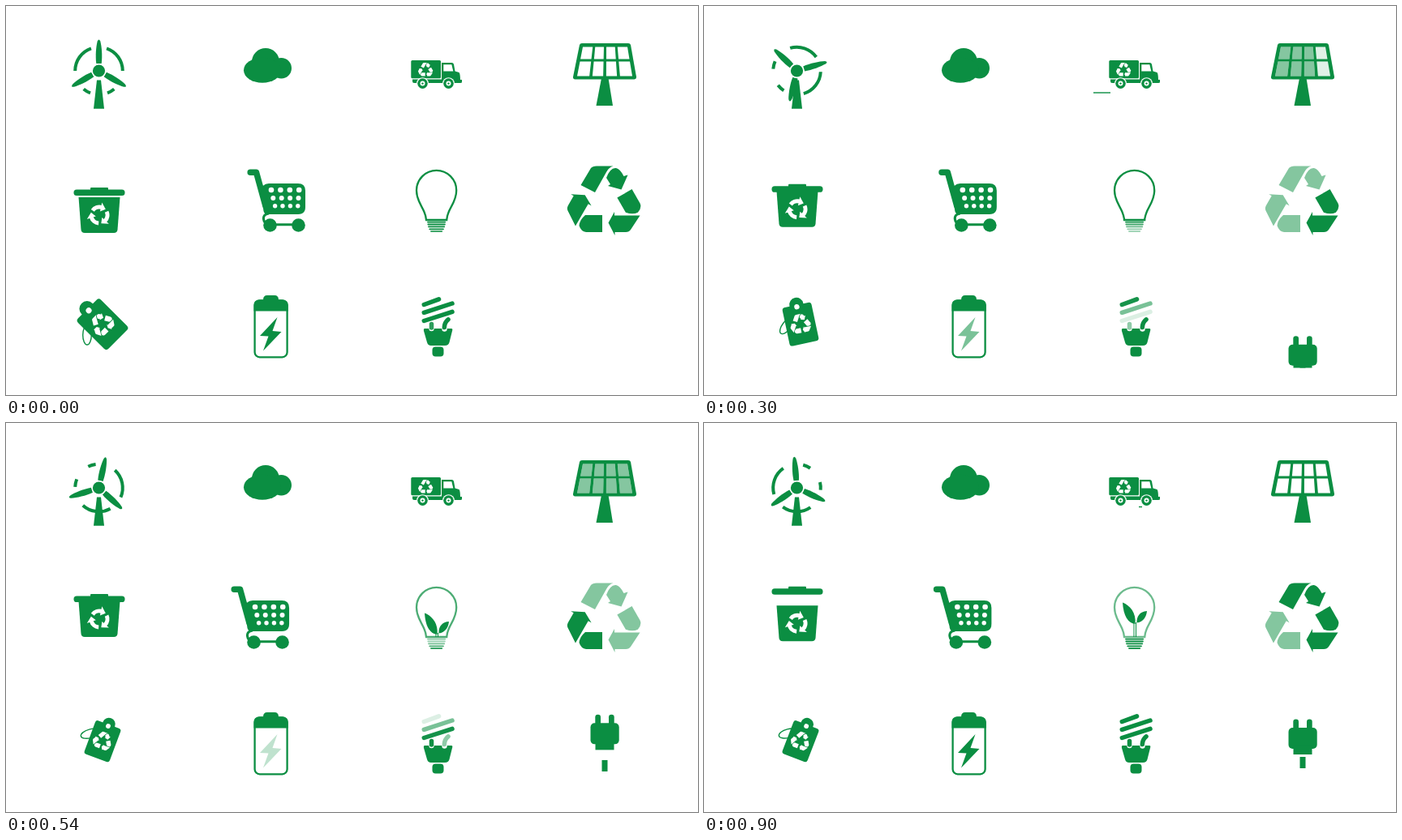
Recreate the animation shown at these times as an HTML page. Size 853 by 480 pixels, loop 960 ms.

```html
<!DOCTYPE html>
<html lang="en">
<head>
<meta charset="utf-8">
<title>Green icons</title>
<style>
  html, body { margin: 0; width: 100%; height: 100%; overflow: hidden; background: #fff; }
  svg { display: block; width: 100vw; height: 100vh; fill: #0b8e42; }
  .line { fill: none; stroke: #0b8e42; }
  .round { stroke-linecap: round; stroke-linejoin: round; }
  .white { fill: #fff; }
</style>
</head>
<body>
<svg viewBox="0 0 853 480">
  <defs>
    <path id="band" d="M-3 16V37H-23Q-29 36.500-31.500 29Q-31 22-24 16Z"/>
    <path id="arrow" d="M4.500 25.500L12 12V16.500H43.500L32 34Q30 37 26 37H12.500V41Z"/>
    <g id="left"><use href="#band"/><use href="#arrow" transform="rotate(120)"/></g>
    <g id="right"><use href="#band" transform="rotate(-120)"/><use href="#arrow"/></g>
    <g id="top">
      <path d="M-29.500-21L-17-42Q-15-44.500-10-44.500H10.500Q5-43 2-37L-12-12Z"/>
      <path d="M2-30Q7-43 14-42Q19-41 23.500-32L28.500-33.500L20.500-15.500L4-20L7-22Z"/>
    </g>
    <g id="recycle"><use href="#left"/><use href="#right"/><use href="#top"/></g>
    <g id="turn">
      <path d="M-8.200-5.700A10 10 0 0 1 2.600-9.700" fill="none" stroke="#fff" stroke-width="5"/>
      <path d="M.9-4.400L3.300-15.600L7.800-7.200Z"/>
    </g>
    <path id="blade" d="M-3.200-9C-4.500-18-3.500-30-1.800-36.500Q0-40.500 1.800-36.500C3.500-30 4.500-18 3.200-9Z"/>
    <path id="glass" d="M518 264C517.500 250 506 244 506 227.500A24.600 24.600 0 0 1 555.200 227.500C555.200 244 543.700 250 543.200 264Z"/>
    <clipPath id="inGlass"><use href="#glass"/></clipPath>
    <clipPath id="floor"><rect x="700" y="340" width="80" height="106.500"/></clipPath>
  </defs>

  <!-- wind turbine -->
  <g transform="translate(114.500 80)">
    <g id="ring" class="line" stroke-width="4"></g>
    <path d="M-2.500 11.500H2.500L6.500 46.700H-6.500Z"/>
    <g id="blades">
      <use href="#blade"/><use href="#blade" transform="rotate(120)"/><use href="#blade" transform="rotate(240)"/>
    </g>
    <circle r="9" class="white"/><circle r="7.600"/>
  </g>

  <!-- cloud -->
  <circle cx="320" cy="69" r="17"/>
  <circle cx="339.300" cy="76.700" r="12.700"/>
  <ellipse cx="316" cy="79.200" rx="23" ry="15.500"/>

  <!-- truck -->
  <g id="road"></g>
  <rect x="499.300" y="67" width="36.700" height="22.300" rx="1.500"/>
  <use href="#recycle" class="white" transform="translate(517.300 79) scale(.2)"/>
  <path d="M537 70H549.500Q551.500 70 552 72L553.500 80.500L558.500 82Q559.800 83 560 91H562V94Q562 95 560 95H503Q501 95 501 93V90.500H537Z"/>
  <path class="white" d="M539.300 72.300H549.300L551.300 80.500H539.300Z"/>
  <g id="wheels"></g>

  <!-- solar panel -->
  <path d="M710 46H767Q769.500 46 770 48L777 87.500Q777.300 90.500 774.500 90.500H701.500Q698.700 90.500 699 87.500L707 48Q707.500 46 710 46Z"/>
  <path d="M734 89H742.500L748 123H727.500Z"/>
  <g id="cells"></g>

  <!-- bin -->
  <g id="bin">
    <path d="M89.500 236H140.500L137.500 276Q137 280 133 280H97Q93 280 92.500 276Z"/>
    <g class="white" transform="translate(115 258)">
      <use href="#turn"/><use href="#turn" transform="rotate(120)"/><use href="#turn" transform="rotate(240)"/>
    </g>
  </g>
  <g id="lid">
    <rect x="83.500" y="226.500" width="63" height="7.600" rx="3.600"/><rect x="104" y="224.100" width="22" height="5" rx="1"/>
  </g>

  <!-- cart -->
  <g id="cart">
    <path class="line round" stroke-width="7.500" d="M301.200 205.200H308.500L320 247"/>
    <path d="M324 219H360Q369 219 369 228V248Q369 257 360 257H322Q318.500 257 317.500 253L314 230Q315 219 324 219Z"/>
    <path class="line" stroke-width="3" d="M324 256C317 257 316 262 319 267M325 269.800H360"/>
    <circle cx="325.500" cy="270.500" r="8.300"/><circle cx="360.500" cy="270.500" r="8.300"/>
    <g id="holes" class="white"></g>
  </g>

  <!-- bulb -->
  <g clip-path="url(#inGlass)">
    <g id="plant">
      <path d="M516 221.500C525 225 533 234 531.500 248C522.500 247 517 238 516 221.500Z"/>
      <path d="M546 232C545.500 239 541 246 533.500 246.500C533 239 537 232.500 546 232Z"/>
      <path class="line" d="M530 246V310M532.500 246V310"/>
    </g>
  </g>
  <use href="#glass" id="outline" class="line" stroke-width="2.300"/>
  <g id="screw"></g>

  <!-- recycling arrows -->
  <g transform="translate(738 242)">
    <use href="#left" id="recLeft"/><use href="#top" id="recTop"/><use href="#right" id="recRight"/>
  </g>

  <!-- tag -->
  <ellipse id="string" class="line" stroke-width="1.400" rx="5.300" ry="12"/>
  <g id="tag">
    <rect x="-20" y="-26.500" width="40" height="53" rx="4"/>
    <circle cy="-27" r="9.500"/><circle cy="-24" r="3.500" class="white"/>
    <use href="#recycle" class="white" transform="scale(.31)"/>
  </g>

  <!-- battery -->
  <rect x="306.600" y="363.500" width="40" height="69.800" rx="6" class="line" stroke-width="2.300"/>
  <path d="M305.500 376.500V369Q305.500 362.500 312 362.500H317Q317 357 322 357H331Q336 357 336 362.500H341Q347.700 362.500 347.700 369V376.500Z"/>
  <path id="bolt" d="M334.500 384L313 407L323.500 407.500L317 425.500L339.500 402L328.500 401Z"/>

  <!-- spiral lamp -->
  <path d="M516 398H549Q551 398 550 401L546.500 415Q545.500 419 541 419H524Q520 419 519 415L515 401Q514.500 398 516 398Z"/>
  <rect x="525.500" y="420.500" width="14" height="12" rx="4"/>
  <circle cx="524.500" cy="398" r="3.200" class="white"/><circle cx="540.500" cy="398.500" r="3.200" class="white"/>
  <g id="tubes" class="line round" stroke-width="5.500">
    <path d="M524.500 392.500V397"/>
    <path d="M515.300 388.500L550 377.300"/>
    <path d="M515.300 378.300L550 367"/>
    <path d="M515.300 368.500L533.500 361.800"/>
    <path d="M540.300 396.500Q540.500 390.500 545 386.800"/>
  </g>

  <!-- plug -->
  <g clip-path="url(#floor)">
    <g id="plug">
      <rect x="726.300" width="6.700" height="16" rx="3.300"/><rect x="743" width="6.700" height="16" rx="3.300"/>
      <rect x="720.500" y="10.500" width="35.200" height="26" rx="5"/><rect x="726.500" y="33" width="23" height="10.500"/>
    </g>
    <rect id="cord" x="734.500" width="7" height="14"/>
  </g>
</svg>

<script>
const STEP = 60, COUNT = 16;
const $ = id => document.getElementById(id);
const clamp = v => Math.max(0, Math.min(1, v));
const mix = (a, b, u) => a + (b - a) * u;

// 0 to 1 between a and b: straight and eased
const ramp = (f, a, b) => clamp((f - a) / (b - a));
const ease = (f, a, b) => { const u = ramp(f, a, b); return u * u * (3 - 2 * u); };

// opacity that sinks by depth around mid
const dip = (f, mid, reach, depth) => 1 - depth * clamp(1 - Math.abs(f - mid) / reach);
// opacity that is halved from a to b
const half = (f, a, b) => 1 - .5 * ramp(f, a, a + 1) * (1 - ramp(f, b - 2, b));

const move = (el, x, y, more = '') => el.setAttribute('transform', `translate(${x} ${y}) ${more}`);
const fade = (el, value) => el.setAttribute('opacity', value);

function add(parent, tag, attrs) {
  const el = document.createElementNS('http://www.w3.org/2000/svg', tag);
  for (const k in attrs) el.setAttribute(k, attrs[k]);
  return $(parent).appendChild(el);
}

function polar(deg, r) {
  const a = deg * Math.PI / 180;
  return `${r * Math.sin(a)} ${-r * Math.cos(a)}`;
}
for (const [a, b] of [[270, 341], [19, 90], [140, 159], [201, 220]])
  add('ring', 'path', { d: `M${polar(a, 29.3)}A29.3 29.3 0 0 1 ${polar(b, 29.3)}` });

for (const cx of [513.5, 545.5])
  [7.4, 6.3, 3, 1.2].forEach((r, n) => add('wheels', 'circle', { cx, cy: 95.6, r, class: n % 2 ? '' : 'white' }));

// solar cells: columns lean with the panel's sides
const columns = [0, 1, 2, 3].map(c => {
  const point = (u, y) => {
    const v = (y - 50.5) / 36;
    return `${711 - 7 * v + u / 4 * (55 + 13 * v)} ${y}`;
  };
  const l = c ? c + .11 : 0, r = c < 3 ? c + .89 : 4;
  const d = [[50.5, 65.4], [68.4, 86.5]].map(([a, b]) =>
    `M${point(l, a)}L${point(r, a)}L${point(r, b)}L${point(l, b)}Z`).join('');
  add('cells', 'path', { d, class: 'white' });
  return add('cells', 'path', { d });
});

for (let row = 0; row < 3; row++)
  for (let n = 0; n < 4; n++)
    add('holes', 'circle', { cx: 327 + 2.3 * row + n * (11.4 - row), cy: 227 + 9.9 * row, r: 3.3 - .3 * row });

const threads = [0, 1, 2, 3, 4].map(n => {
  const width = 23 - .5 * n * n;
  return add('screw', 'rect', { x: 530.6 - width / 2, y: 265.7 + 2.9 * n, width, height: 1.8, rx: .8 });
});
const tubes = [...$('tubes').children];

const road = [
  { start: 611, y: 106.3, edge: 568 },
  { start: 801, y: 101.8, edge: 540 },
  { start: 918, y: 102.8, edge: 540 }
].map(line => ({ ...line, el: add('road', 'rect', { y: line.y, height: 1.4 }) }));

function draw(f) {
  const spin = `rotate(${14.7 * f})`;
  move($('ring'), 0, 0, spin);
  move($('blades'), 0, 0, spin);

  for (const { start, edge, el } of road) {
    const right = start - 22 * f;
    const a = Math.max(480, right - 30), b = Math.min(edge, right);
    el.setAttribute('x', a);
    el.setAttribute('width', Math.max(0, b - a));
  }

  columns.forEach((el, c) => {
    const on = .4 + 1.4 * c, off = 10.2 + .65 * c;
    fade(el, .5 * ramp(f, on, on + 1.6) * (1 - ramp(f, off, off + 1.6)));
  });

  // the bin pushes its lid up, then drops away from it
  const rise = 25.3 * ramp(f, 1.7, 13.2);
  move($('bin'), 0, 5.2 * Math.max(0, f - 13.2) - rise);
  move($('lid'), 0, -Math.max(0, rise - 3));

  move($('cart'), -21.4 * (ease(f, 1, 10.5) - ease(f, 11.5, 23.5)), 0);

  move($('plant'), 0, Math.max(0, 76 - 7 * f));
  fade($('outline'), dip(f, 13, 6, .8));
  threads.forEach((el, n) => fade(el, dip(f, 10 - 1.4 * n, 5.5, .65)));

  const turn = f % 15;
  fade($('recLeft'), half(turn, 0, 7.6));
  fade($('recTop'), half(turn, 3, 11.6));
  fade($('recRight'), half(turn, 6, 11.6));

  const swing = ease(f, .5, 9.5);
  move($('tag'), 119, 392.7, `rotate(${mix(-45, 21, swing)}) scale(${mix(1, .83, swing)})`);
  move($('string'), mix(100, 104, swing), mix(406, 383, swing), `rotate(${mix(0, 75, swing)})`);

  fade($('bolt'), dip(f, 7.7, 5, 1));
  tubes.forEach((el, n) => fade(el, dip(f, 3.4 + 1.8 * n, 4, .9)));

  // overshoots, then settles
  move($('plug'), 0, 450 - 93 * ease(f, .5, 10) + 8.5 * ease(f, 10, 12.5));
  move($('cord'), 0, mix(450, 412, ease(f, 3, 10.5)));
}

const start = performance.now();
function tick() {
  const step = Math.floor(Math.max(0, performance.now() - start) / STEP) % COUNT;
  draw(step < 10 ? step : step + 1); // motion skips one beat here
  requestAnimationFrame(tick);
}
tick();
</script>
</body>
</html>
```
